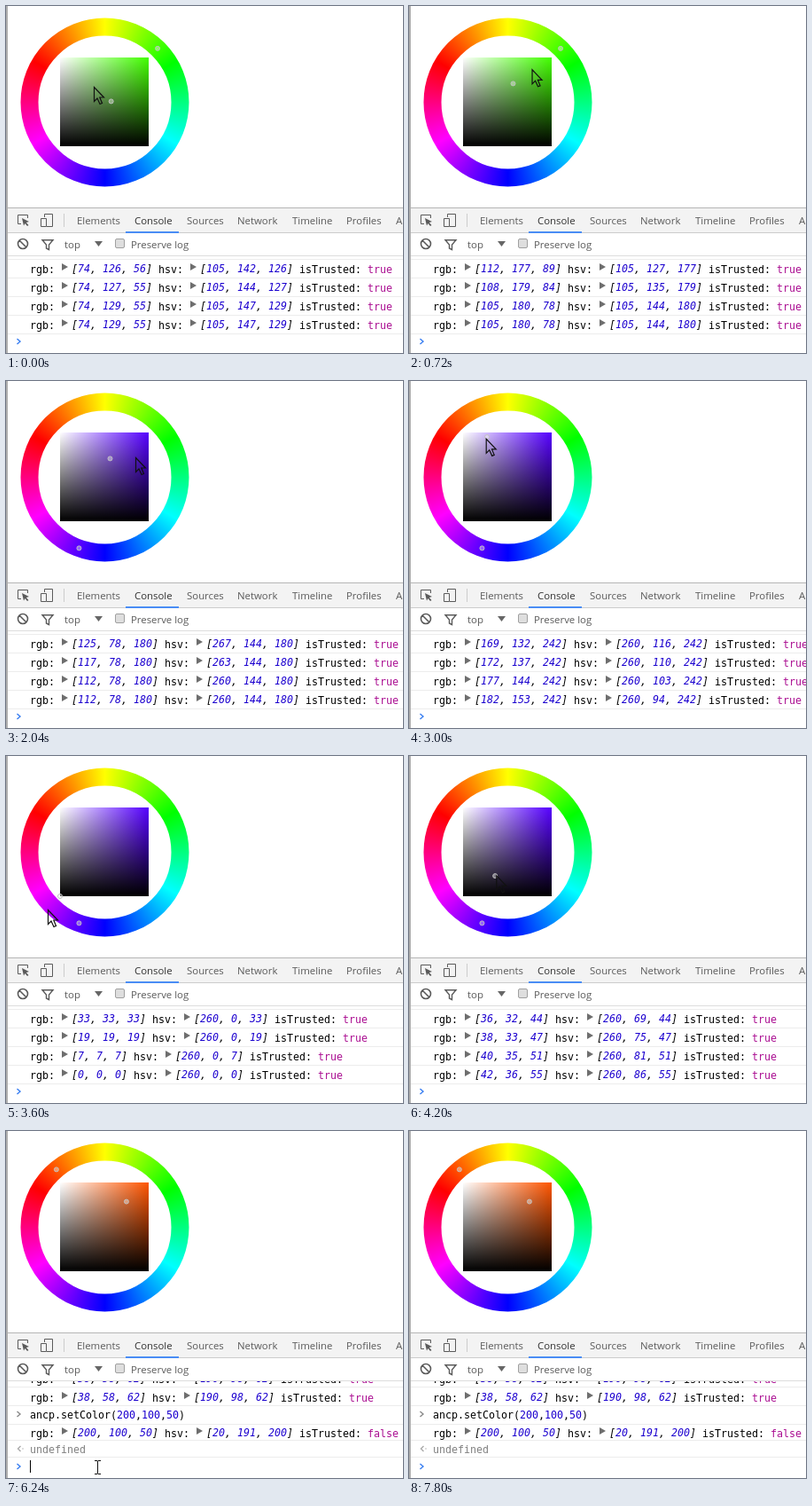
An HTML page with a canvas for the animation above (7.92 s loop, 448 by 391 pixels).

```html
<!DOCTYPE html>
<html lang="en">
<head>
<meta charset="utf-8">
<title>Color picker with console</title>
<style>
html, body { margin: 0; width: 100%; height: 100%; overflow: hidden; background: #fff }
canvas { display: block }
</style>
</head>
<body>
<canvas id="stage" width="448" height="391"></canvas>
<script>
const ctx = document.getElementById('stage').getContext('2d');
const LOOP = 7920, STEP = 120, EVENT = 30, TYPE = 5400, ENTER = 6240, BLINK = 480;
const CX = 111.5, CY = 108.5, SX = 61, SY = 58, SIZE = 100;
const MONO = '11.63px "DejaVu Sans Mono", monospace';
const UI = '11.4px "Open Sans", sans-serif';
const BLUE = '#1c00cf', PURPLE = '#aa0d91', DARK = '#000', ICON = '#5a5a5a';
const COMMAND = 'ancp.setColor(200,100,50)';
const FIRST = { h: 104.5, s: 142, v: 126 }, LAST = { h: 20, s: 191, v: 200 };

// Each drag eases the color towards new values; k > 1 slows down at the end.
const drags = [
  { from: -120, to: -60, s: 147, v: 129, k: .82 },
  { from: 210, to: 390, s: 92, v: 172 },
  { from: 390, to: 570, s: 144, v: 180 },
  { from: 900, to: 1320, h: 50, k: .87 },
  { from: 1320, to: 1830, h: -100, k: 1.4 },
  { from: 2130, to: 2160, s: 225, v: 190 },
  { from: 2160, to: 2880, s: 116, v: 242 },
  { from: 2880, to: 3000, s: 69, k: .45 },
  { from: 3000, to: 3300, s: 0, v: 152 },
  { from: 3300, to: 3570, v: 0, k: 1.4 },
  { from: 3720, to: 4230, s: 98, v: 62 },
  { from: 4380, to: 4530, h: -170, k: 3.9 }
];

const lerp = (a, b, p) => a + (b - a) * p;

function colorAt(t) {
  if (t >= ENTER) return LAST;
  const color = { ...FIRST };
  for (const { from, to, k = 1, ...goal } of drags) {
    if (t <= from) break;
    const p = 1 - (1 - Math.min(1, (t - from) / (to - from))) ** k;
    for (const c in goal) color[c] = lerp(color[c], goal[c], p);
  }
  return color;
}

// the four newest drag events
function recent(t) {
  const times = [];
  for (let e = -120; e <= t - EVENT; e += EVENT)
    if (drags.some(d => e >= d.from && e <= d.to + EVENT)) times.push(e);
  return times.slice(-4).map(colorAt);
}

function toRgb({ h, s, v }) {
  return [5, 3, 1].map(n => {
    const k = (n + (h + 360) / 60) % 6;
    return Math.round(v - v * s / 255 * Math.max(0, Math.min(k, 4 - k, 1)));
  });
}

function onRing({ h }, r) {
  const a = (h - 60) * Math.PI / 180;
  return [CX + r * Math.sin(a), CY - r * Math.cos(a)];
}

function onSquare({ s, v }) {
  return [SX + s / 255 * SIZE, SY + (1 - v / 255) * SIZE];
}

// The mouse leads the color a little while dragging.
function grip(drag, t) {
  const color = colorAt(Math.min(t + 15, ENTER - 1));
  return 'h' in drag ? onRing(color, 77) : onSquare(color);
}

const stops = [[0, 99, 91], [180, 99, 91], [2040, 146, 86], [3600, 47, 173], [4680, 134, 308], [5160, 103, 379]]
  .concat(drags.flatMap(d => [d.from, d.to].map(t => [t, ...grip(d, t)])))
  .sort((a, b) => a[0] - b[0]);

function mouseAt(t) {
  const drag = drags.find(d => t >= d.from && t <= d.to);
  if (drag) return grip(drag, t);
  const i = stops.findIndex(s => s[0] > t);
  if (i < 0) return stops.at(-1).slice(1);
  const [t0, x0, y0] = stops[i - 1], [t1, x1, y1] = stops[i], p = (t - t0) / (t1 - t0);
  return [lerp(x0, x1, p), lerp(y0, y1, p)];
}

function rect(x, y, w, h, color) {
  ctx.fillStyle = color;
  ctx.fillRect(x, y, w, h);
}

function text(str, x, y, color = DARK, font = MONO) {
  ctx.font = font;
  ctx.fillStyle = color;
  ctx.fillText(str, x, y);
}

function path(d, x, y, stroke, fill, width = 1) {
  const p = new Path2D(d);
  ctx.save();
  ctx.translate(x, y);
  if (fill) { ctx.fillStyle = fill; ctx.fill(p); }
  if (stroke) { ctx.strokeStyle = stroke; ctx.lineWidth = width; ctx.stroke(p); }
  ctx.restore();
}

// monospaced run with coloured numbers; returns its end
function code(str, x, y, font) {
  for (const part of str.match(/\d+|\D+/g)) {
    text(part, x, y, /\d/.test(part) ? BLUE : DARK, font);
    x += part.length * 7;
  }
  return x;
}

function marker([x, y]) {
  ctx.beginPath();
  ctx.arc(x, y, 2.5, 0, 7);
  ctx.fillStyle = 'rgba(255,255,255,.4)';
  ctx.fill();
  ctx.strokeStyle = '#c0c0c0';
  ctx.lineWidth = 1;
  ctx.stroke();
}

function drawPicker(color) {
  const ring = ctx.createConicGradient(-Math.PI / 2, CX, CY);
  for (let i = 0; i <= 6; i++) ring.addColorStop(i / 6, `hsl(${60 + i * 60} 100% 50%)`);
  ctx.beginPath();
  ctx.arc(CX, CY, 85, 0, 7);
  ctx.strokeStyle = ring;
  ctx.lineWidth = 20;
  ctx.stroke();

  const across = ctx.createLinearGradient(SX, 0, SX + SIZE, 0);
  across.addColorStop(0, '#fff');
  across.addColorStop(1, `hsl(${color.h} 100% 50%)`);
  rect(SX, SY, SIZE, SIZE, across);
  const down = ctx.createLinearGradient(0, SY, 0, SY + SIZE);
  down.addColorStop(0, 'rgba(0,0,0,0)');
  down.addColorStop(1, '#000');
  rect(SX, SY, SIZE, SIZE, down);

  marker(onRing(color, 85));
  marker(onSquare(color));
}

function drawToolbars() {
  rect(2, 227, 446, 29, '#f3f3f3');
  rect(2, 227, 446, 1, '#b5b5b5');
  rect(2, 255, 446, 1, '#ccc');
  rect(2, 281, 446, 1, '#ddd');
  rect(135, 254, 60, 2, '#4a8df5');
  rect(65, 234, 1, 15, '#ccc');
  path('M4 10.5H.5V.5H11.5V4', 13, 235, ICON);
  path('M5 4L13 8L9.8 9L12.5 12L11 13L8.5 10L7 12.5Z', 13, 235, null, ICON);
  path('M4.5 4V.5H13.5V14.5H7M.5 5.5H6.5V14.5H.5Z', 39, 234, ICON);
  path('M5.5 0A5.5 5.5 0 1 1 -5.5 0A5.5 5.5 0 1 1 5.5 0M-4 -4L4 4', 19, 268, ICON, null, 1.6);
  path('M1 .7H13L8.5 6V11.5L5.5 10V6Z', 40, 263, ICON, null, 1.4);
  path('M0 0H9L4.5 6Z', 100, 265, null, '#666');
  path('M.5 2Q.5 .5 2 .5H9Q10.5 .5 10.5 2V9Q10.5 10.5 9 10.5H2Q.5 10.5 .5 9Z', 123, 262, '#a0a0a0', '#dedede');
  let x = 80;
  for (const tab of ['Elements', 'Console', 'Sources', 'Network', 'Timeline', 'Profiles', 'Application']) {
    text(tab, Math.round(x), 246, tab == 'Console' ? '#333' : ICON, UI);
    x += ctx.measureText(tab).width + 16;
  }
  text('top', 66, 273, ICON, UI);
  text('Preserve log', 141, 273, ICON, UI);
}

function chevron(y, color, back) {
  path(back ? 'M4 -3L1 0L4 3M6 0H7' : 'M0 -3L3.5 0L0 3', 12.5, y, color, null, 1.4);
}

function drawEvent(color, y, trusted = true) {
  const array = (label, list, x) => {
    text(label, x, y);
    path('M0 0L7 4L0 8Z', x + 36, y - 11, null, '#6e6e6e');
    return code(`[${list.join(', ')}]`, x + 47, y - 1, 'italic ' + MONO) + 7;
  };
  const { h, s, v } = color;
  let x = array('rgb:', toRgb(color), 27);
  x = array('hsv:', [(h + 360) % 360, s, v].map(Math.round), x);
  text('isTrusted:', x, y);
  text(String(trusted), x + 77, y, PURPLE);
}

function drawConsole(t) {
  const done = t >= ENTER, events = recent(t);
  ctx.save();
  ctx.beginPath();
  ctx.rect(2, 282, 446, 109);
  ctx.clip();
  for (const y of done ? [288, 309, 330, 348, 367] : [285, 306, 327, 348, 369]) rect(2, y, 446, 1, '#ececec');
  if (done) {
    drawEvent(events[2], 284);
    drawEvent(events[3], 305);
    chevron(319, '#888');
    code(COMMAND, 27, 324);
    drawEvent(LAST, 345, false);
    chevron(358, '#aaa', true);
    text('undefined', 27, 363, '#808080');
  } else {
    events.forEach((e, i) => drawEvent(e, 301 + i * 21));
  }
  chevron(378, '#367cf1');
  const typed = t < TYPE || done ? '' : COMMAND.slice(0, 5 * (1 + (t - TYPE) / STEP));
  const end = typed ? code(typed, 27, 383) : 27;
  if (typed || done && Math.floor((t - ENTER) / BLINK) % 2 == 0) rect(end, 371, 1, 14, '#000');
  ctx.restore();
}

function drawTooltip(t) {
  if (t < 4560 || t >= 4800) return;
  ctx.globalAlpha = t < 4680 ? .8 : .45;
  rect(117, 285, 248, 23, '#fff');
  path('M.5 .5H247.5V22.5H.5Z', 117, 285, '#aaa');
  text('Do not clear log on page reload / navigation', 124, 300, '#575757', UI);
  ctx.globalAlpha = 1;
}

function drawMouse(t) {
  const [x, y] = mouseAt(t);
  if (y < 369) path('M.5 .5V16.5L4 13L7 19.5L9.5 18.5L6.8 12H11.5Z', x, y, '#111', null, 1.2);
  else if (t < 6840) path('M0 .5H3L3.5 1L4 .5H7M3.5 1V15M0 15.5H3L3.5 15L4 15.5H7', 100, 371, '#111');
}

const start = performance.now();
function frame() {
  const t = Math.floor((performance.now() - start) % LOOP / STEP) * STEP;
  rect(0, 0, 448, 391, '#fff');
  drawPicker(colorAt(t));
  drawToolbars();
  drawConsole(t);
  rect(0, 0, 2, 391, '#adadad');
  drawTooltip(t);
  drawMouse(t);
  requestAnimationFrame(frame);
}
frame();
</script>
</body>
</html>
```
